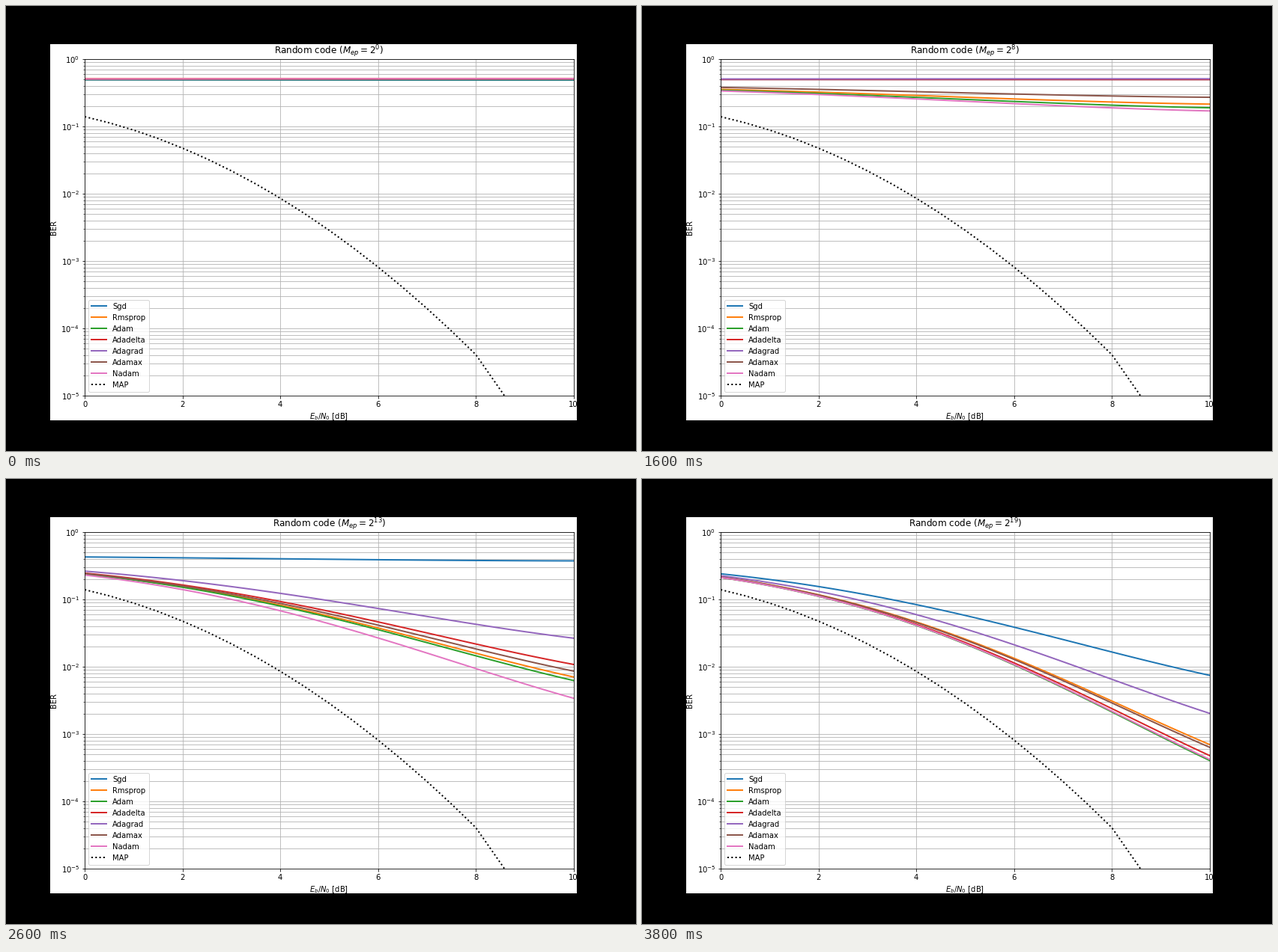
These frames come from a looping animation (841 by 595 pixels, 4000 ms). A matplotlib script:

```python
import math

import numpy as np
import matplotlib.pyplot as plt
from matplotlib.animation import FuncAnimation
from matplotlib.patches import Rectangle

W, H, DPI = 841, 595, 72
FRAMES, INTERVAL = 20, 200

# Learning curve of each optimizer: ceiling, midpoint, rate, onset (log2 of epochs)
OPTIMIZERS = {
    "Sgd": (20, 25.65, 0.112, 8),
    "Rmsprop": (3.36, 9.2, 0.305, 0),
    "Adam": (3.6, 9.27, 0.27, 0),
    "Adadelta": (3.5, 10.38, 0.33, 8),
    "Adagrad": (3.8, 10.33, 0.147, 8),
    "Adamax": (3.4, 9.72, 0.315, 0),
    "Nadam": (3.45, 8.75, 0.333, 0),
}

jitter = np.random.default_rng(3).normal(0, 0.015, (FRAMES, len(OPTIMIZERS)))
erfc = np.vectorize(math.erfc)
t = np.linspace(0, 1, 41)


def quality(k, ceiling, middle, rate, onset):
    """Gompertz growth of the decision margin at 10 dB, opening after the onset."""
    gate = np.clip((k - onset) / 2, 0, 1)
    return gate * ceiling * math.exp(-math.exp(rate * (middle - k)))


def ber(q):
    """Bit error rate over 0..10 dB for margin q at the right end."""
    start = q / (1.5 + 0.8 * q)
    bend = t * (1 - t) * q * (0.2 - 0.08 * q - 0.17 * (1 - 2 * t))
    margin = start + (q - start) * t + bend
    return erfc(margin / math.sqrt(2)) / 2


def map_bound():
    x = np.arange(0, 8.5, 0.5)
    decades = 0.856 + 0.164 * x + 0.0347 * x ** 2
    return np.append(x, 9), 10 ** -np.append(decades, 5.43)


fig = plt.figure(figsize=(W / DPI, H / DPI), dpi=DPI, facecolor="black")
fig.add_artist(Rectangle((59 / W, 41 / H), 703 / W, 503 / H, transform=fig.transFigure,
                         color="white", lw=0, zorder=-1))
ax = fig.add_axes([105.21 / W, 74.05 / H, 652.3 / W, 449.94 / H])

lines = [ax.semilogy(10 * t, np.ones_like(t), lw=2, label=name)[0] for name in OPTIMIZERS]
ax.semilogy(*map_bound(), "k:", lw=2, label="MAP")
ax.set_xlim(0, 10)
ax.set_ylim(1e-5, 1)
ax.grid(True, which="both")
ax.set_xlabel("$E_b/N_0$ [dB]")
ax.set_ylabel("BER")
ax.legend(loc="lower left")
title = ax.set_title("")


def update(k):
    for line, params, noise in zip(lines, OPTIMIZERS.values(), jitter[k]):
        q = quality(k, *params)
        line.set_ydata(ber(q + noise * math.exp(-3 * q)))
    title.set_text(r"Random code ($M_{ep}=2^{%d}$)" % k)
    return [*lines, title]


anim = FuncAnimation(fig, update, frames=FRAMES, interval=INTERVAL,
                     repeat=True, repeat_delay=0, blit=False)
plt.show()
```
